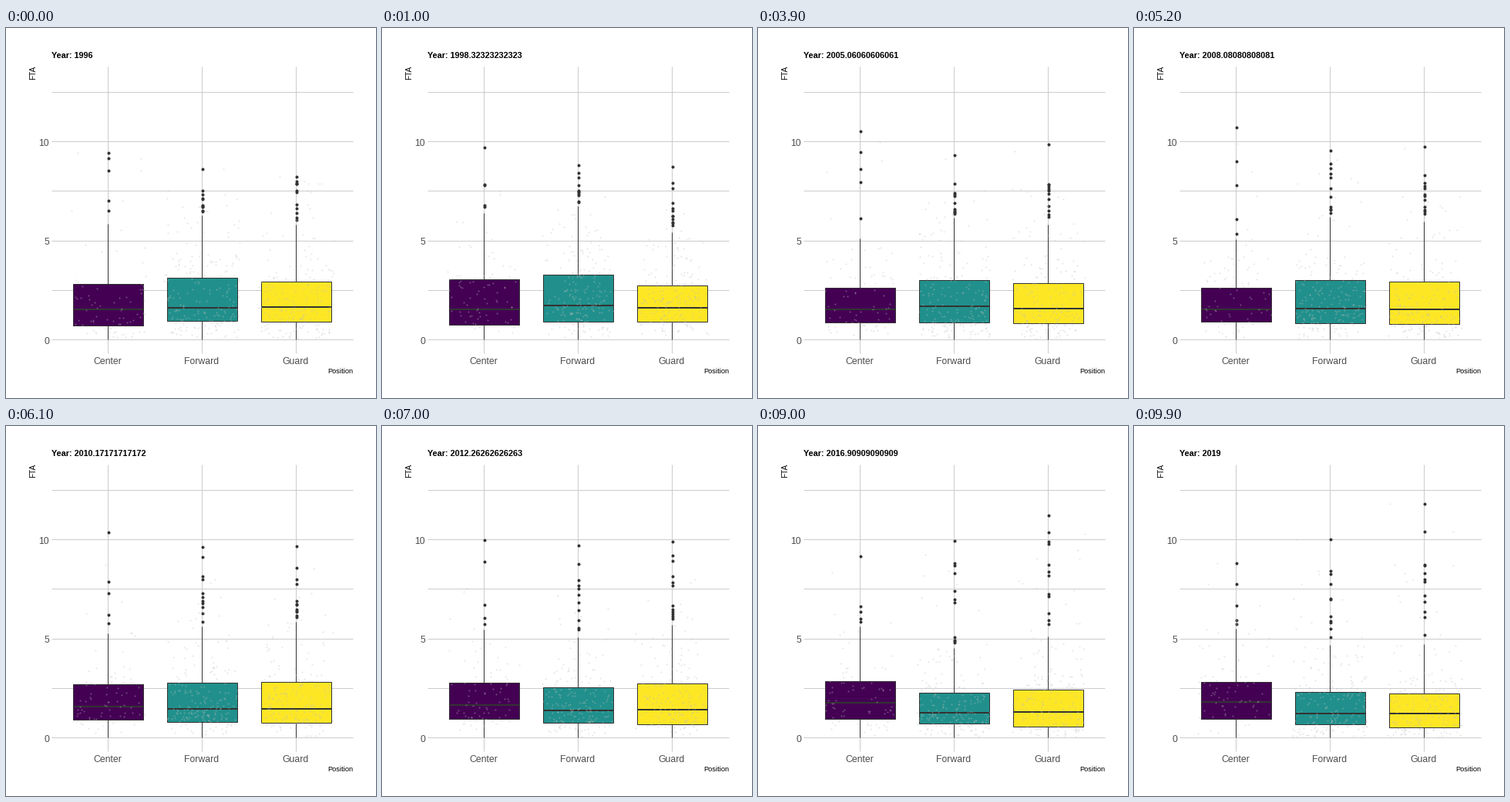
A matplotlib script for the animation above (10 s loop, 480 px wide and 480 px high).

```python
import numpy as np
import matplotlib.pyplot as plt
from matplotlib.animation import FuncAnimation
from matplotlib.patches import Rectangle

plt.rcParams["font.family"] = "Liberation Sans"
PX = 0.75  # points per pixel at 96 dpi
FRAMES, FIRST, SPAN = 100, 1996, 23
LAST = FRAMES - 1
Y0, UNIT = 404.02, 25.7
HALF, JITTER = 45.3, 48.8
GRID, INK, DOT, AXIS = "#cccccc", "#333333", "#bebebe", "#4d4d4d"

# Upper quartiles turn at these steps; the slower trends are evenly spaced
TURNS = [0, 10, 26, 52, 81, 99]

GROUPS = [
    dict(name="Center", color="#440154", count=80, extremes=5,
         q1=[.7, .9, .95], median=[1.55, 1.52, 1.82],
         q3=[2.8, 3.03, 2.58, 2.6, 2.88, 2.8], top=[9.4, 10.8, 8.8]),
    dict(name="Forward", color="#21908c", count=200, extremes=11,
         q1=[.92, .82, .66], median=[1.62, 1.85, 1.58, 1.36, 1.24],
         q3=[3.1, 3.27, 3.0, 3.0, 2.22, 2.3], top=[8.6, 9.5, 10]),
    dict(name="Guard", color="#fde725", count=185, extremes=12,
         q1=[.9, .8, .5], median=[1.64, 1.54, 1.24],
         q3=[2.9, 2.73, 2.8, 2.9, 2.6, 2.23], top=[8.2, 9.9, 9.6, 11.8]),
]


def to_y(value):
    return Y0 - UNIT * np.asarray(value)


def trend(values, step):
    return np.interp(step, np.linspace(0, LAST, len(values)), values)


fig = plt.figure(figsize=(5, 5), dpi=96, facecolor="white")
ax = fig.add_axes([0, 0, 1, 1])
ax.set(xlim=(0, 480), ylim=(480, 0))
ax.axis("off")


def label(x, y, text, size, **kw):
    return ax.text(x, y, text, fontsize=size * PX, **kw)


def stroke(xs=(), ys=(), color=INK, width=1, z=2):
    return ax.plot(xs, ys, color=color, lw=width * PX, zorder=z,
                   solid_capstyle="butt")[0]


for value in np.arange(0, 13, 2.5):
    stroke([59, 450], [to_y(value)] * 2, GRID, z=1)
    if value % 5 == 0:
        label(56, to_y(value) + 5.5, f"{value:.0f}", 12.2, ha="right", color=AXIS)

title = label(59, 39, "", 10.9, weight="bold")
label(450, 448, "Position", 9.3, ha="right")
label(40, 67.2, "FTA", 10, rotation=90, va="bottom", ha="right")


class Box:
    def __init__(self, index, spec):
        self.spec, self.x = spec, 132 + 122 * index
        rng = np.random.default_rng(40 + index)
        self.years = [self.sample(rng, y * LAST / SPAN) for y in range(SPAN + 1)]

        stroke([self.x] * 2, [50, 422], GRID, z=1)
        label(self.x - .5, 436, spec["name"], 12.2, ha="center", color=AXIS)
        self.low, self.high = stroke(), stroke()
        self.outliers, = ax.plot([], [], "o", ms=4 * PX, mew=0, color=INK, zorder=3)
        self.left = self.x - HALF + .5
        self.rect = ax.add_patch(Rectangle((self.left, 0), 2 * HALF + .6, 1, ec=INK,
                                           fc=spec["color"], lw=PX, zorder=4))
        self.median = stroke(width=2, z=5)
        self.dots = ax.scatter([], [], s=(2 * PX) ** 2, color=DOT, alpha=.4,
                               lw=0, zorder=6)

    def stats(self, step):
        """Whisker ends and quartiles, with the usual 1.5 IQR fence."""
        q1 = trend(self.spec["q1"], step)
        q3 = np.interp(step, TURNS, self.spec["q3"])
        fence = q3 + 1.5 * (q3 - q1) - .1
        return 0, q1, trend(self.spec["median"], step), q3, fence

    def sample(self, rng, step):
        """One year's jittered points and its sorted outliers."""
        count, extremes = self.spec["count"], self.spec["extremes"]
        low, q1, mid, q3, fence = self.stats(step)
        shoulder = q3 + .4 * (fence - q3)
        body = np.interp(rng.random(count - extremes), [0, .25, .5, .75, .9, 1],
                         [low, q1, mid, q3, shoulder, fence])
        u = np.sort(rng.random(extremes))
        u[-1] = 1
        start = fence + .2
        tail = start + (trend(self.spec["top"], step) - start) * u ** 1.5
        ys = to_y(rng.permutation(np.concatenate([body, tail])))
        xs = self.x + rng.uniform(-JITTER, JITTER, count)
        return np.column_stack([xs, ys]), to_y(tail)

    def draw(self, step):
        low, q1, mid, q3, fence = to_y(self.stats(step))
        self.low.set_data([self.x] * 2, [low, q1])
        self.high.set_data([self.x] * 2, [q3, fence])
        self.rect.set_y(q3)
        self.rect.set_height(q1 - q3)
        self.median.set_data([self.left, self.left + 2 * HALF + .6], [mid + .5] * 2)

        time = step * SPAN / LAST
        year = min(int(time), SPAN - 1)
        t = time - year
        dots, tail = [(1 - t) * a + t * b
                      for a, b in zip(self.years[year], self.years[year + 1])]
        self.dots.set_offsets(dots)
        self.outliers.set_data([self.x + .5] * len(tail), tail)


boxes = [Box(i, spec) for i, spec in enumerate(GROUPS)]


def update(step):
    title.set_text(f"Year: {FIRST + step * SPAN / LAST:.15g}")
    for box in boxes:
        box.draw(step)
    return []


anim = FuncAnimation(fig, update, frames=FRAMES, interval=100, repeat=True,
                     repeat_delay=0, init_func=lambda: update(0))
plt.show()
```
